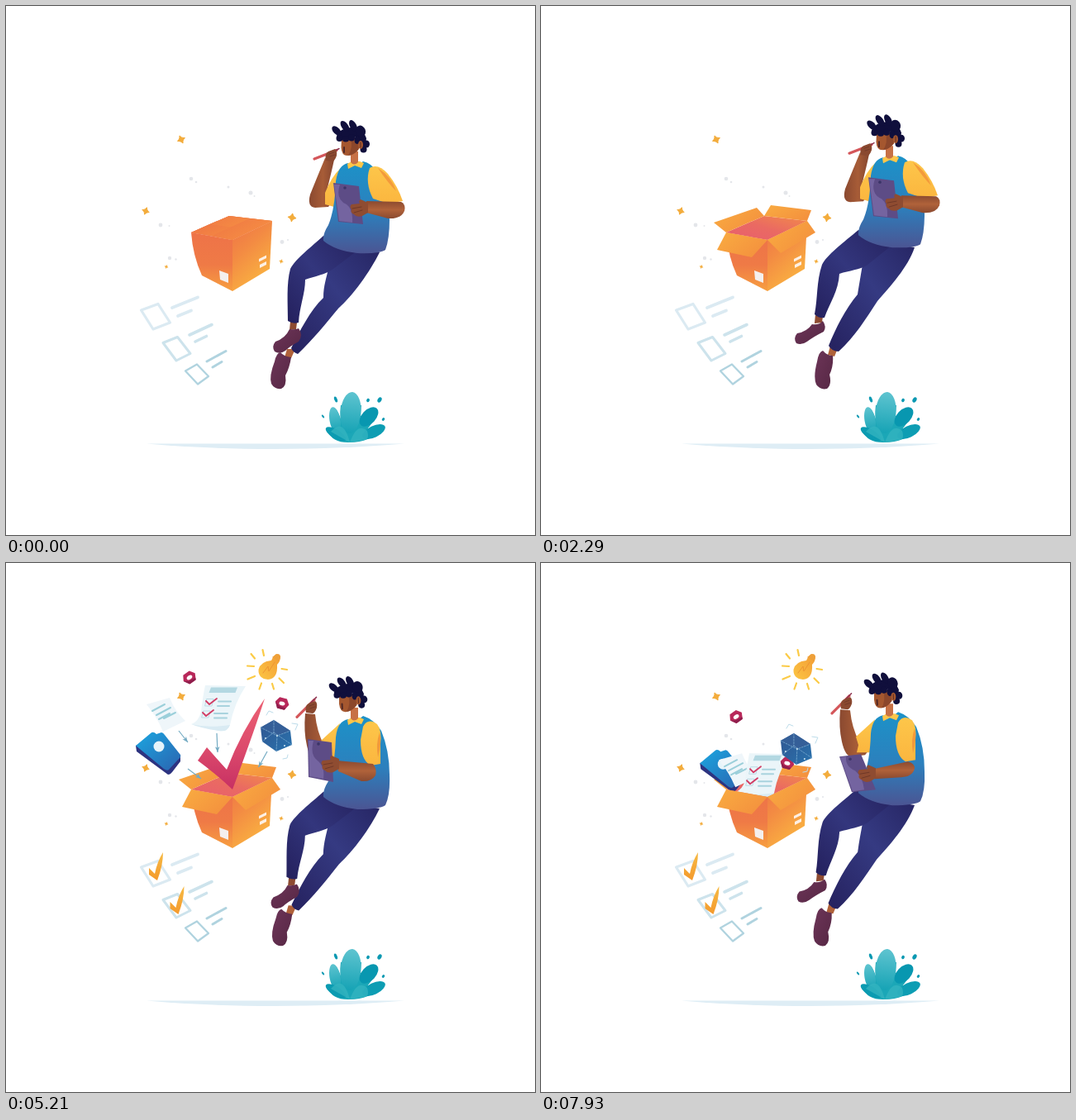
An HTML page for the animation above (8 s loop, 640 by 640 pixels).

```html
<!DOCTYPE html>
<html lang="en">
<head>
<meta charset="utf-8">
<title>Packing checklist</title>
<style>
html,body{margin:0;width:100%;height:100%;overflow:hidden;background:#fff}
svg{display:block;width:100vw;height:100vh}
.ln{fill:none;stroke-linecap:round;stroke-linejoin:round}
</style>
</head>
<body>
<svg viewBox="0 0 640 640">
<defs>
<linearGradient id="gVest" x1="0" y1="0" x2="0" y2="1"><stop offset="0" stop-color="#1c92c8"/><stop offset=".55" stop-color="#2c80bd"/><stop offset="1" stop-color="#4b5593"/></linearGradient>
<linearGradient id="gLegL" x1="1" y1="0" x2="0" y2="1"><stop offset="0" stop-color="#25225f"/><stop offset=".5" stop-color="#33367d"/><stop offset="1" stop-color="#24205d"/></linearGradient>
<linearGradient id="gLegR" x1="1" y1="0" x2="0" y2="1"><stop offset="0" stop-color="#262563"/><stop offset=".45" stop-color="#353a82"/><stop offset="1" stop-color="#25215e"/></linearGradient>
<linearGradient id="gSkin" x1="0" y1="0" x2="0" y2="1"><stop offset="0" stop-color="#8b4a30"/><stop offset=".5" stop-color="#b0623a"/><stop offset="1" stop-color="#8a4a30"/></linearGradient>
<linearGradient id="gArm" x1="0" y1="0" x2="1" y2="0"><stop offset="0" stop-color="#8a4930"/><stop offset=".5" stop-color="#a75c37"/><stop offset="1" stop-color="#7e422e"/></linearGradient>
<linearGradient id="gSleeve" x1="0" y1="0" x2="0" y2="1"><stop offset="0" stop-color="#fdc64a"/><stop offset="1" stop-color="#fbb63f"/></linearGradient>
<linearGradient id="gShoe" x1="0" y1="0" x2="1" y2="1"><stop offset="0" stop-color="#6d3558"/><stop offset="1" stop-color="#562744"/></linearGradient>
<linearGradient id="gLeft" x1="0" y1="0" x2="0" y2="1"><stop offset="0" stop-color="#ee7348"/><stop offset=".55" stop-color="#ef7a46"/><stop offset="1" stop-color="#f79f40"/></linearGradient>
<linearGradient id="gRight" x1="0" y1="0" x2=".5" y2="1"><stop offset="0" stop-color="#ee7247"/><stop offset=".45" stop-color="#f38b43"/><stop offset="1" stop-color="#fab341"/></linearGradient>
<linearGradient id="gIn" x1="0" y1="1" x2="1" y2="0"><stop offset="0" stop-color="#e85e6e"/><stop offset=".5" stop-color="#ea6a62"/><stop offset="1" stop-color="#f28b49"/></linearGradient>
<linearGradient id="gCheck" x1="0" y1="0" x2="0" y2="1"><stop offset="0" stop-color="#ec6173"/><stop offset=".55" stop-color="#dc4a6c"/><stop offset="1" stop-color="#c73063"/></linearGradient>
<linearGradient id="gFolder" x1="0" y1="0" x2="1" y2="1"><stop offset="0" stop-color="#1ba6e0"/><stop offset="1" stop-color="#2b64b0"/></linearGradient>
<linearGradient id="gCube" x1="0" y1="0" x2="1" y2="1"><stop offset="0" stop-color="#2f5590"/><stop offset="1" stop-color="#2a73ae"/></linearGradient>
<linearGradient id="gBulb" x1="1" y1="0" x2="0" y2="1"><stop offset="0" stop-color="#f29a34"/><stop offset="1" stop-color="#fcc644"/></linearGradient>
<linearGradient id="gLeaf" x1="0" y1="0" x2="0" y2="1"><stop offset="0" stop-color="#5fc4d0"/><stop offset="1" stop-color="#16a3b5"/></linearGradient>
<linearGradient id="gTick" x1="0" y1="0" x2="0" y2="1"><stop offset="0" stop-color="#f6bb45"/><stop offset="1" stop-color="#f4992c"/></linearGradient>
</defs>

<path d="M170 529.6H482C430 534 380 536 325 536S220 534 170 529.6Z" fill="#deedf5"/>
<g id="plant"></g>
<g id="specks"></g>
<g id="list"></g>

<path d="M224 274L270 254L322 260L274 283Z" fill="url(#gIn)"/>
<path id="flapBR"/><path id="flapBL"/>

<g id="arrows" stroke="#74abc3" fill="#74abc3" stroke-width="1.2"></g>

<g id="folder">
<path d="M157 221L158 228L196 256Q199 256 201 253L211 240V233L180 210Z" fill="#2d3380"/>
<path d="M157 221L175 206Q178 203 182 207L188 205Q190 205 192 208L211 232Q212 235 209 237L197 250Q195 252 191 249Z" fill="url(#gFolder)"/>
<circle cx="185" cy="222" r="6.5" fill="#e6f4fa"/>
</g>
<g id="note">
<path d="M170 171L198 163Q204 179 217 191L190 204Q182 185 170 171Z" fill="#eff6fa"/>
<path class="ln" d="M177 179L192 171M182 184L199 175M185 189L198 182M191 188L205 181" stroke="#9bcfda" stroke-width="2"/>
</g>
<g id="form">
<path d="M241 148L290 149Q276 170 271 196Q268 205 257 203L224 195Q233 192 236 180Q238 162 241 148Z" fill="#ebf5f9"/>
<path d="M224 195Q236 200 257 203Q268 205 271 196Q245 200 224 195Z" fill="#d9ebf3"/>
<path d="M248 150.5H280L277.500 157H245.500Z" fill="#b3d8e2"/>
<path class="ln" d="M257 167.500H272M256 173H270M252 182H268M252 187.500H267" stroke="#a9d3de" stroke-width="2"/>
<path class="ln" d="M243 164.500H251L249 173H241ZM239 179H247L245 187H237Z" stroke="#bcdbe6" stroke-width="1"/>
<path class="ln" d="M242 167L246 171L255 164M238 181L242 185L251 178" stroke="#d23c64" stroke-width="1.800"/>
</g>
<g id="ringA"></g>
<g id="ringB"></g>
<g id="cube">
<path d="M308 199L324 190L344 203L346 220L327 228L310 216Z" fill="url(#gCube)"/>
<path d="M308 199L324 190L344 203L328 209Z" fill="#355f98"/>
<path class="ln" d="M308 199L328 209L344 203M328 209L327 228M324 190V205L310 216M324 205L346 220" stroke="#84b5d7" stroke-width=".7" stroke-dasharray="2 1.500"/>
<g fill="#cfe7f3"><circle cx="328" cy="209" r="1"/><circle cx="314" cy="212" r="1"/><circle cx="337" cy="221" r="1"/></g>
<path class="ln" d="M315 184L318 179L323 181M346 194L353 195L350 202M335 237L340 236L341 232" stroke="#bcdcea" stroke-width="1"/>
</g>
<g id="bulb">
<path d="M321 118Q323 113 327 110L332 113Q332 119 328 123Q329 140 317 141Q305 140 305.500 129Q308 119 321 118Z" fill="url(#gBulb)"/>
<path d="M322 114L326.500 110.500Q331 109 332 113L330.500 119Z" fill="#eea03a"/>
<path class="ln" d="M311 133L317 125L318 131L325 120" stroke="#ee9433" stroke-width="1"/>
<path class="ln" d="M296.500 110L301 115.500M310.500 105L312 112M292 124.500L300 125M292.500 140.500L301 137M306.500 152.500L309 145.500M322 146L324 152.500M330.500 139.500L336 145M333.500 128L340 129" stroke="#fbcb47" stroke-width="2.200"/>
</g>
<path id="check" d="M232 239L243 223L267 250Q285 203 313 164Q298 210 274 274Q255 256 232 239Z" fill="url(#gCheck)"/>

<path d="M224 274L274 283V345L237 326Q226 302 224 274Z" fill="url(#gLeft)"/>
<path d="M274 283L322 260L319 318L274 345Z" fill="url(#gRight)"/>
<path d="M258 320L269 324V335L259 331Z" fill="#f4efee"/>
<path d="M306 306L315 301.500V305L306 309.500ZM307 313L315 309V313L307 317Z" fill="#fdf0e4"/>
<path id="flapFL"/><path id="flapFR"/>

<path id="ankleR" fill="#b0623a"/><path id="shoeR" fill="url(#gShoe)"/><path id="legR" fill="url(#gLegR)"/>
<path id="ankleL" fill="#8e4b32"/><path id="shoeL" fill="url(#gShoe)"/><path id="legL" fill="url(#gLegL)"/>
<g id="torso">
<path id="armL" fill="url(#gArm)"/><path id="sleeveL" fill="url(#gSleeve)"/>
<path id="vest" fill="url(#gVest)"/>
<path d="M413 191L418 188H428L433 190L430 196L422 193L414 197Z" fill="#fdc64a"/>
<path d="M417 176H426L426 189Q421 194 417 189Z" fill="#c77146"/>
<g id="head">
<path d="M406 160L405.500 171Q406 181 413 181Q422 180 427 173L429 160Z" fill="#a5572f"/>
<path d="M417 160H430L426 174Q421 180 414 181Q420 172 417 160Z" fill="#8c472b"/>
<path class="ln" d="M409 171V177" stroke="#4f2725" stroke-width="2"/>
<g id="hair" fill="#100f3c"></g>
<ellipse cx="429" cy="168" rx="3" ry="5" fill="#a5572f"/>
<path class="ln" d="M429 165V171" stroke="#5b2d26" stroke-width="1"/>
</g>
<path id="pencil" class="ln" stroke="#d4565a" stroke-width="3.200"/>
<path id="lead" class="ln" stroke="#8d3350" stroke-width="1.500"/>
<g id="handL">
<path d="M387 187Q385 179 390 176L398 173Q401 175 400 181Q398 187 395 188Z" fill="#8a4930"/>
<path class="ln" d="M391 179L397 177M392 182L398 180" stroke="#733a29" stroke-width="1"/>
</g>
<path id="board" fill="#5d4c86"/><path id="sheen" fill="#7464a0"/>
<circle id="clip" r="1.800" fill="#3c3468"/>
<path id="sleeveR" fill="url(#gSleeve)"/><path id="fold" fill="#f39a3b"/>
<path id="armR" fill="url(#gSkin)"/>
<g id="handR">
<path d="M438 238L429 234Q426 236 428 239L418 240Q415 243 418 246Q416 250 421 252Q424 256 431 254L438 250Z" fill="#8f4c31"/>
<path class="ln" d="M419 245L430 243M421 250L431 247" stroke="#6f3828" stroke-width="1"/>
</g>
</g>
</svg>
<script>
const LOOP = 8000;
const $ = id => document.getElementById(id);
const set = (id, name, v) => $(id).setAttribute(name, v);
const clamp = v => Math.max(0, Math.min(1, v));
const span = (t, a, b) => clamp((t - a) / (b - a));
const inOut = p => p < .5 ? 2 * p * p : 1 - 2 * (1 - p) * (1 - p);
const out = p => 1 - (1 - p) ** 3;
const backIn = p => 2.70158 * p ** 3 - 1.70158 * p * p;
const backOut = p => 1 - backIn(1 - p);
const lerp = (a, b, p) => a + (b - a) * p;

// Blend two strings that hold the same count of numbers.
const NUM = /-?\d+(\.\d+)?/g;
function mix(a, b, p) {
  const goal = b.match(NUM);
  let i = 0;
  return a.replace(NUM, n => +lerp(+n, +goal[i++], p).toFixed(2));
}

// Static decoration
const circle = (x, y, r, fill) => `<circle cx="${x}" cy="${y}" r="${r}" fill="${fill}"/>`;
const star = (x, y, r, a = 20) =>
  `<path transform="translate(${x} ${y}) rotate(${a}) scale(${r})" d="M0-1Q.2-.2 1 0Q.2 .2 0 1Q-.2 .2-1 0Q-.2-.2 0-1Z" fill="#f3ac3c" stroke="#f3ac3c" stroke-width=".2"/>`;
$('specks').innerHTML =
  [[224, 209, 2.3], [230, 213, 1.3], [269, 219, 1.5], [296, 226, 2.5], [300.5, 230, 1], [187, 265, 2.4],
   [197.5, 266, 1], [334, 285.5, 2.4], [341, 283, 1.1], [198, 305, 2.2], [205.5, 306.5, 1.2]]
    .map(d => circle(...d, '#e4e6ea')).join('') +
  star(212, 161.5, 5, -25) + star(169, 248, 4.6) + star(346, 256, 5, 8) + star(333, 309, 2.4) + star(194, 315.5, 2.1);

const leaf = (x, y, rx, ry, a, fill) => `<ellipse cx="${x}" cy="${y}" rx="${rx}" ry="${ry}" fill="${fill}" transform="rotate(${a} ${x} ${y})"/>`;
$('plant').innerHTML =
  '<path d="M416 528Q394 519 392 495Q398 480 404 497ZM416 528Q402 506 405 483H430Q428 508 416 528ZM416 528L429 496L450 492Q440 515 416 528ZM416 528L437 511L455 512Q440 528 416 528ZM416 528Q395 529 389 514Q405 513 416 528Z" fill="#1ba7b7"/>' +
  leaf(398, 501, 6.5, 16, -10, 'url(#gLeaf)') +
  leaf(417, 492, 12.5, 25, 5, 'url(#gLeaf)') +
  leaf(439, 497, 8.5, 14, 43, '#0897b0') +
  leaf(445, 515, 7, 15, 64, '#0d9db3') +
  leaf(399, 518, 5.5, 14, -58, '#0b9bb1') +
  '<path d="M393 515Q408 497 416 528ZM416 528Q425 503 437 514Q440 524 434 525Z" fill="#34b5c1" opacity=".75"/>' +
  leaf(399, 476, 1.8, 3.6, -20, '#0a99b2') + leaf(383.5, 496.5, 1, 2.3, -40, '#0a99b2') +
  leaf(438, 477, 1.8, 2.2, 30, '#0a99b2') + leaf(452, 476.5, 2.3, 3.4, 30, '#0a99b2') +
  leaf(456.500, 500, 1.5, 2, 40, '#0a99b2');

const row = (box, lines, tint, w) =>
  `<g class="ln" stroke="${tint}"><path d="${box}" stroke-width="${w}"/><path d="${lines}" stroke-width="${w + .6}"/></g>`;
const TICK = 'M173 369L180 376Q183 361 190 350Q190 366 183 384L173 377Z';
$('list').innerHTML =
  row('M163.500 368L184 360.500L198.500 383L178 391Z', 'M201 365L232 352.500M208 375L224 368.500', '#dbeaf2', 3.2) +
  row('M190 407.500L207.500 400.500L223 420.500L206 429Z', 'M222 398L249 385.500M229 406L242.500 399.500', '#cde3ec', 3) +
  row('M217 441.500L231 433.500L245 448L232 457.500Z', 'M243 430L266 417.500M250 437L261 430.500', '#b0d3df', 2.3) +
  ['tick1', 'tick2'].map(id => `<path id="${id}" d="${TICK}" fill="url(#gTick)"/>`).join('');

const ring = (x, y, a) => `<g transform="translate(${x} ${y}) rotate(${a})">
<path d="M-8.500 0L-5-6.500L4-7L8.500-1L5 6.500L-4 7Z" fill="#b8285a"/><path d="M-8.500 0L-4 7L5 6.500L6 4L-3 3.500Z" fill="#8e1e4c"/>
<ellipse rx="3.600" ry="2.300" fill="#fff"/></g>`;
$('ringA').innerHTML = ring(222, 138.5, -32);
$('ringB').innerHTML = ring(334, 170, 18);

const arrowAt = [[220, 249, 236, 261, 19, 13], [209, 203, 220, 217, 35, 48], [255, 206, 256, 229, 5, 40], [316, 228, 305.5, 247, -26, 24]];
$('arrows').innerHTML = arrowAt.map(([x, y, u, v], i) => {
  const a = Math.atan2(v - y, u - x) * 180 / Math.PI;
  return `<g id="arrow${i}"><path d="M${x} ${y}L${u} ${v}"/><path d="M0 0L-7-2.800L-5 0L-7 2.800Z" transform="translate(${u} ${v}) rotate(${a})" stroke="none"/></g>`;
}).join('');

const curl = (x, y, rx, ry, a) => `<ellipse cx="${x}" cy="${y}" rx="${rx}" ry="${ry}" transform="rotate(${a} ${x} ${y})"/>`;
$('hair').innerHTML = '<path d="M400 157Q404 148 417 147Q432 148 436 160L434 174L425 166L424 158L414 162L404 161Z"/>' +
  curl(400, 151, 4, 7, -45) + curl(410, 145.5, 4, 7.5, -35) + curl(420, 145, 4, 7.5, -28) + curl(429, 151.5, 6, 7, -20) +
  curl(436, 167, 4, 4.5, 0) + curl(432.500, 173.500, 4, 4, 0) + curl(403.500, 160, 4, 4, 0) + curl(411, 161, 4, 3.500, 0) +
  curl(418, 159.500, 4, 4, 0) + curl(424.500, 162, 3, 5, 0);

// Flaps: hinge pair, free edge when shut, free edge when open, time span
const flaps = {
  flapBR: [[270, 254, 322, 260], [246, 264, 298, 271], [278, 241, 327, 247], 800, 1750],
  flapBL: [[224, 274, 270, 254], [249, 278, 295, 257], [209, 262, 261, 244], 880, 1800],
  flapFL: [[224, 274, 274, 283], [246, 264, 298, 271], [213, 295, 255, 304], 900, 1950],
  flapFR: [[274, 283, 322, 260], [249, 278, 295, 257], [290, 299, 332, 274], 650, 1800]
};
for (const id in flaps) {
  document.querySelector('defs').insertAdjacentHTML('beforeend',
    `<linearGradient id="g${id}" x1="0" y1="0" x2="1" y2=".6"><stop id="${id}0" offset="0"/><stop id="${id}1" offset="1"/></linearGradient>`);
  set(id, 'fill', `url(#g${id})`);
}
function drawFlap(id, t) {
  const [hinge, shut, open, a, b] = flaps[id];
  const p = inOut(span(t, a, b)), q = 1 - p;
  const f = hinge.map((h, i) => q * q * shut[i] + 2 * p * q * (i % 2 ? h - 28 : h) + p * p * open[i]);
  set(id, 'd', `M${hinge[0]} ${hinge[1]}L${hinge[2]} ${hinge[3]}L${f[2]} ${f[3]}L${f[0]} ${f[1]}Z`);
  set(id + 0, 'stop-color', mix('rgb(238,116,68)', 'rgb(249,172,65)', p));
  set(id + 1, 'stop-color', mix('rgb(246,143,67)', 'rgb(244,146,62)', p));
}

// Objects: rest centre, launch span, shift while falling back, fall start
const items = {
  bulb: [317, 127, 2330, 2900, 0, 0, 9000],
  folder: [184, 230, 2500, 3560, 35, 21, 7700],
  note: [193, 183, 2450, 3400, 45, 67, 7300],
  form: [257, 176, 2400, 3300, 11, 82, 7250],
  ringA: [222, 138, 2480, 3450, 14, 47, 7740],
  ringB: [334, 170, 2500, 3400, -36, 72, 7400],
  cube: [327, 209, 2550, 3450, -18, 16, 7600]
};
function drawItem(id, t) {
  const [x, y, a, b, dx, dy, fall] = items[id];
  const p = out(span(t, a, b)), e = t > fall ? ((t - fall) / (7930 - fall)) ** 2 : 0;
  const cx = lerp(274, x, p) + dx * e, cy = lerp(283, y, p) + dy * e, s = lerp(.15, 1, p);
  set(id, 'transform', `translate(${cx} ${cy}) scale(${s}) translate(${-x} ${-y})`);
  set(id, 'visibility', t > a ? 'visible' : 'hidden');
}

// Legs: lowest and raised shapes
const legs = {
  legL: ['M384 278C370 291 350 306 344 318C339 336 341 360 341 381Q347 385 354 383C355 364 362 348 362 331C374 327 386 325 396 318L425 296Z',
         'M384 271C366 286 345 302 340 313C333 334 335 354 331 373Q336 378 343 377C349 360 360 345 361 324C373 320 386 319 394 314L425 289Z'],
  legR: ['M452 298C440 322 420 350 402 366C388 383 370 405 353 421Q347 419 345 414C355 394 368 368 384 353C384 338 388 328 390 318L400 290Z',
         'M452 292C444 316 422 340 407 357C393 378 380 400 360 418Q352 418 348 411C356 391 369 365 383 349C385 336 387 325 389 313L400 283Z'],
  shoeL: ['M343 391Q350 392 354 390Q360 398 354 406Q343 412 338 417Q331 422 325 418Q321 412 326 406Q338 402 343 391Z',
          'M328 385Q337 386 341 381Q346 388 342 394Q330 400 322 406Q315 411 309 408Q305 402 310 396Q322 394 328 385Z'],
  shoeR: ['M332 419Q336 424 345 425Q343 438 338 447Q340 460 333 463Q325 464 321 457Q318 448 325 430Q327 420 332 419Z',
          'M341 417Q346 423 353 423Q354 436 349 446Q352 458 346 463Q338 465 333 458Q329 449 334 430Q336 418 341 417Z'],
  ankleL: ['M344 382L352 383L351 391L343 392Z', 'M332 374L341 376L340 383L331 384Z'],
  ankleR: ['M340 415L350 415L345 426L337 425Z', 'M350 411L359 414L355 424L347 422Z']
};

// Upper body: thinking, writing, board lowered
const pose = {
  armL: ['M386 184Q376 208 368 228Q364 243 374 244L390 243Q396 236 400 222L389 220Q394 200 397 186Z',
         'M362 183Q360 205 364 222Q368 240 376 240L392 238Q398 232 402 216L385 222Q376 205 374 184Z'],
  sleeveL: ['M405 196Q394 206 386 226L386 240L397 243L402 215Z', 'M404 195Q392 206 381 216Q384 226 382 235L398 235L402 212Z'],
  vest: ['M414 190Q420 197 432 188Q442 190 448 200Q458 222 464 258Q464 282 459 295Q452 300 425 299Q398 296 384 284Q383 276 390 265Q398 246 399 212Q402 192 414 190Z',
         'M414 190Q420 197 432 186Q445 190 454 204Q464 228 464 258Q465 282 459 294Q452 299 425 299Q398 296 384 284Q383 276 390 265Q398 246 399 212Q401 192 414 190Z'],
  pencil: ['M373 185L400 174.500', 'M352 187.500L373 166.500'],
  lead: ['M393 178L403 172.500', 'M367 172L375.500 163.500'],
  board: ['M396 214L427 218L432 264L402 261Z', 'M365 214L394 218L396 266L366 260Z', 'M361 240L387 237L405 280L376 283Z'],
  sheen: ['M397 216L404 216Q398 234 412 240Q420 246 419 262L403 260Z', 'M366 216L372 216Q367 234 378 241Q386 248 384 262L367 259Z',
          'M362 241L369 240Q368 252 380 257Q389 264 391 280L377 282Z'],
  sleeveR: ['M440 196Q450 190 462 203Q474 218 480 236L462 239L444 233Q434 214 440 196Z', 'M432 199Q438 188 449 196Q455 204 453 220L453 244L441 246L429 239Q429 215 432 199Z'],
  fold: ['M450 196Q466 206 472 224Q462 214 450 196Z', 'M452 206Q455 218 450 236Q447 220 452 206Z'],
  armR: ['M436 236L478 237Q484 240 482 248Q478 258 462 257L436 250Z', 'M400 240L444 244Q449 250 447 258Q442 266 430 265L402 253Z',
         'M402 255L444 246Q452 248 452 254Q450 264 436 265L404 267Z'],
  handL: ['translate(0 0)', 'translate(-24 -5)'],
  handR: ['translate(0 0)', 'translate(-35 0)', 'translate(-33 16)'],
  clip: ['translate(410 220)', 'translate(378 220)', 'translate(374 243)'],
  head: ['translate(0 0)rotate(0 418 180)', 'translate(-2 0)rotate(-3 418 180)']
};

function drawMan(t) {
  const k = (1 - Math.cos((t + 50) / 6000 * 2 * Math.PI)) / 2 / .88;
  for (const id in legs) set(id, 'd', mix(...legs[id], k));
  set('torso', 'transform', `translate(0 ${-6.8 * k})`);
  const write = inOut(span(t, 3080, 3880)), lower = inOut(span(t, 7420, 7940));
  for (const id in pose) {
    const [a, b, c] = pose[id];
    const v = mix(a, b, write);
    set(id, a[0] === 'M' ? 'd' : 'transform', c ? mix(v, c, lower) : v);
  }
}

function draw(t) {
  for (const id in flaps) drawFlap(id, t);
  for (const id in items) drawItem(id, t);

  const s = t < 5500 ? (t < 3030 ? 0 : backOut(span(t, 3030, 4330))) : 1 - backIn(span(t, 6278, 7578));
  set('check', 'transform', `translate(274 274) scale(${Math.max(0, s)}) translate(-274 -274)`);

  const slide = Math.max(0, (t - 6880) / 330) ** 2;
  arrowAt.forEach((a, i) => set('arrow' + i, 'transform', `translate(${a[4] * slide} ${a[5] * slide})`));
  set('arrows', 'opacity', span(t, 3350, 3650) * (1 - span(t, 7150, 7380)));

  [[0, 0, 3560], [25.5, 41, 4420]].forEach(([x, y, a], i) => {
    const p = out(span(t, a, a + 380));
    set('tick' + (i + 1), 'transform', `translate(${x + 180} ${y + 383}) scale(${p}) translate(-180 -383)`);
  });
  drawMan(t);
}

const start = performance.now();
function tick() {
  draw((performance.now() - start) % LOOP);
  requestAnimationFrame(tick);
}
draw(0);
requestAnimationFrame(tick);
</script>
</body>
</html>
```
